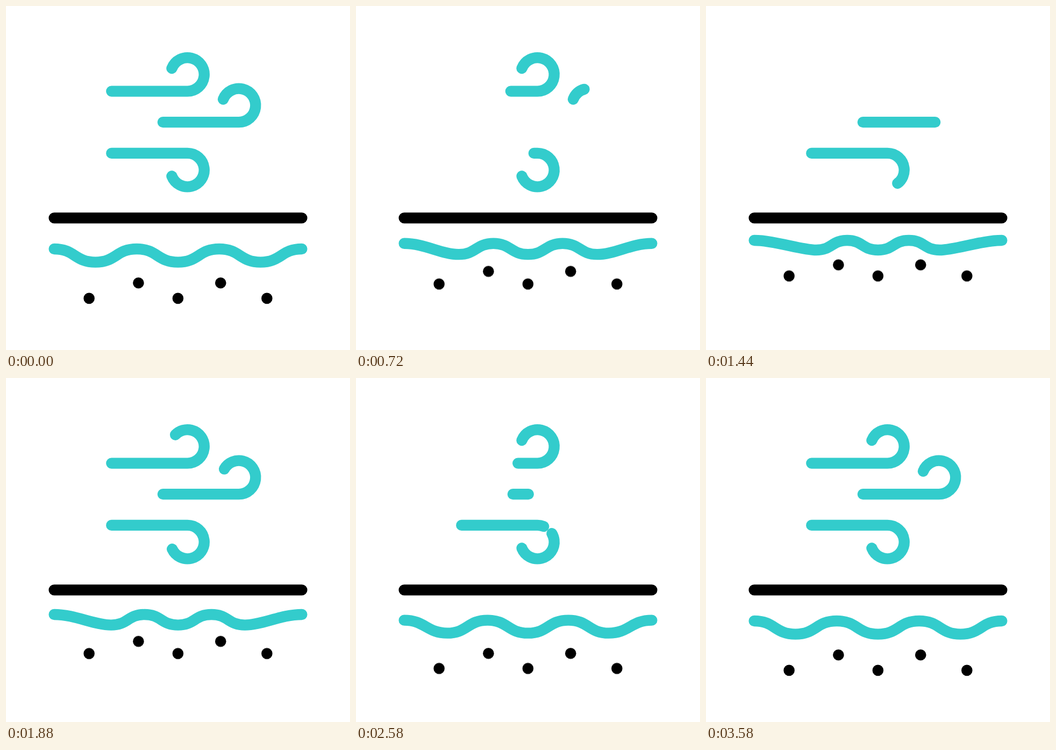
Write an HTML page without scripts that moves like this. It is 640x640 px and loops after 3600 ms.

```html
<!DOCTYPE html>
<html lang="en">
<head>
<meta charset="utf-8">
<title>Wind over soil</title>
<style>
  html, body { margin: 0; width: 100%; height: 100%; overflow: hidden; background: #fff; }
  svg { display: block; width: 100vw; height: 100vh; }
  path { fill: none; stroke: #3cc; stroke-width: 20.4; stroke-linecap: round; }
  .ground { stroke: #000; }

  /* Each gust is two strokes: the old one is erased from its tail, the new one grows behind it. */
  .old, .new { stroke-dasharray: 100 300; animation: 3.6s infinite; }
  .old { animation-timing-function: cubic-bezier(.333, 0, .667, 1); }
  .new { animation-timing-function: cubic-bezier(.333, .667, .667, 1); }

  .top .old { animation-name: erase-top; }
  .top .new { animation-name: draw-top; }
  .mid .old { animation-name: erase-mid; }
  .mid .new { animation-name: draw-mid; }
  .low .old { animation-name: erase-low; }
  .low .new { animation-name: draw-low; }

  @keyframes erase-top {
    0%, 10.4%, 55.01%, 61.25% { stroke-dashoffset: 0; }
    35.5%, 55%, 86.3%, 100% { stroke-dashoffset: -101; }
  }
  @keyframes draw-top {
    0%, 41.9%, 55.01%, 77.8% { stroke-dashoffset: 101; }
    55%, 99%, 100% { stroke-dashoffset: 0; }
  }
  @keyframes erase-mid {
    0% { stroke-dashoffset: 0; animation-timing-function: cubic-bezier(.3, 0, .4, 1); }
    55.01% { stroke-dashoffset: 0; }
    29.3%, 55%, 71.4%, 100% { stroke-dashoffset: -101; }
  }
  @keyframes draw-mid {
    0%, 34%, 55.01%, 70% { stroke-dashoffset: 101; }
    55%, 99%, 100% { stroke-dashoffset: 0; }
  }
  @keyframes erase-low {
    0%, 8.3%, 55.01%, 58.3% { stroke-dashoffset: 0; }
    32.3%, 55%, 81.3%, 100% { stroke-dashoffset: -101; }
  }
  @keyframes draw-low {
    0%, 22%, 55.01% { stroke-dashoffset: 101; }
    63.9% { stroke-dashoffset: 101; animation-timing-function: linear; }
    71.67% { stroke-dashoffset: 44.6; }
    55%, 99.3%, 100% { stroke-dashoffset: 0; }
  }

  /* Water and grains rise together, then sink back. */
  .water, .grains { animation: 3.6s infinite cubic-bezier(.44, 0, .33, 1); }
  .water { animation-name: swell; }
  .grains { animation-name: lift; }
  .upper { --rise: -33.7px; }
  .lower { --rise: -41.7px; }

  @keyframes swell {
    0%, 83.33%, 100% {
      d: path("M89.6 452c38.4 0 38.4 24.6 76.8 24.6s38.4-24.6 76.8-24.6s38.4 24.6 76.8 24.6s38.4-24.6 76.8-24.6s38.4 24.6 76.8 24.6s38.4-24.6 76.8-24.6");
    }
    41.67% {
      d: path("M89.6 436c38.4 0 86.9 18 115.6 18s28.7-18 57.4-18s28.7 18 57.4 18s28.7-18 57.4-18s28.7 18 57.4 18s77.2-18 115.6-18");
      animation-timing-function: cubic-bezier(.3, 0, .4, 1);
    }
  }
  @keyframes lift {
    0%, 83.33%, 100% { transform: translateY(0); }
    41.67% { transform: translateY(var(--rise)); animation-timing-function: cubic-bezier(.3, 0, .4, 1); }
  }
</style>
</head>
<body>
<svg viewBox="0 0 640 640">
  <defs>
    <path id="gust" pathLength="100" d="M196.3 158.6H337.6A31.2 31.2 0 1 0 308.5 116"/>
  </defs>

  <g class="top">
    <use class="old" href="#gust"/>
    <use class="new" href="#gust"/>
  </g>
  <g class="mid" transform="translate(95.6 57.5)">
    <use class="old" href="#gust"/>
    <use class="new" href="#gust"/>
  </g>
  <g class="low" transform="translate(0 432.5) scale(1 -1)">
    <use class="old" href="#gust"/>
    <use class="new" href="#gust"/>
  </g>

  <path class="ground" d="M89.6 394.4H550.4"/>
  <path class="water" d="M89.6 452"/>

  <g class="grains upper">
    <circle cx="246.4" cy="515.2" r="10.3"/>
    <circle cx="399.3" cy="515.2" r="10.3"/>
  </g>
  <g class="grains lower">
    <circle cx="154.6" cy="543.9" r="10.3"/>
    <circle cx="319.9" cy="543.9" r="10.3"/>
    <circle cx="485.4" cy="543.9" r="10.3"/>
  </g>
</svg>
</body>
</html>
```
